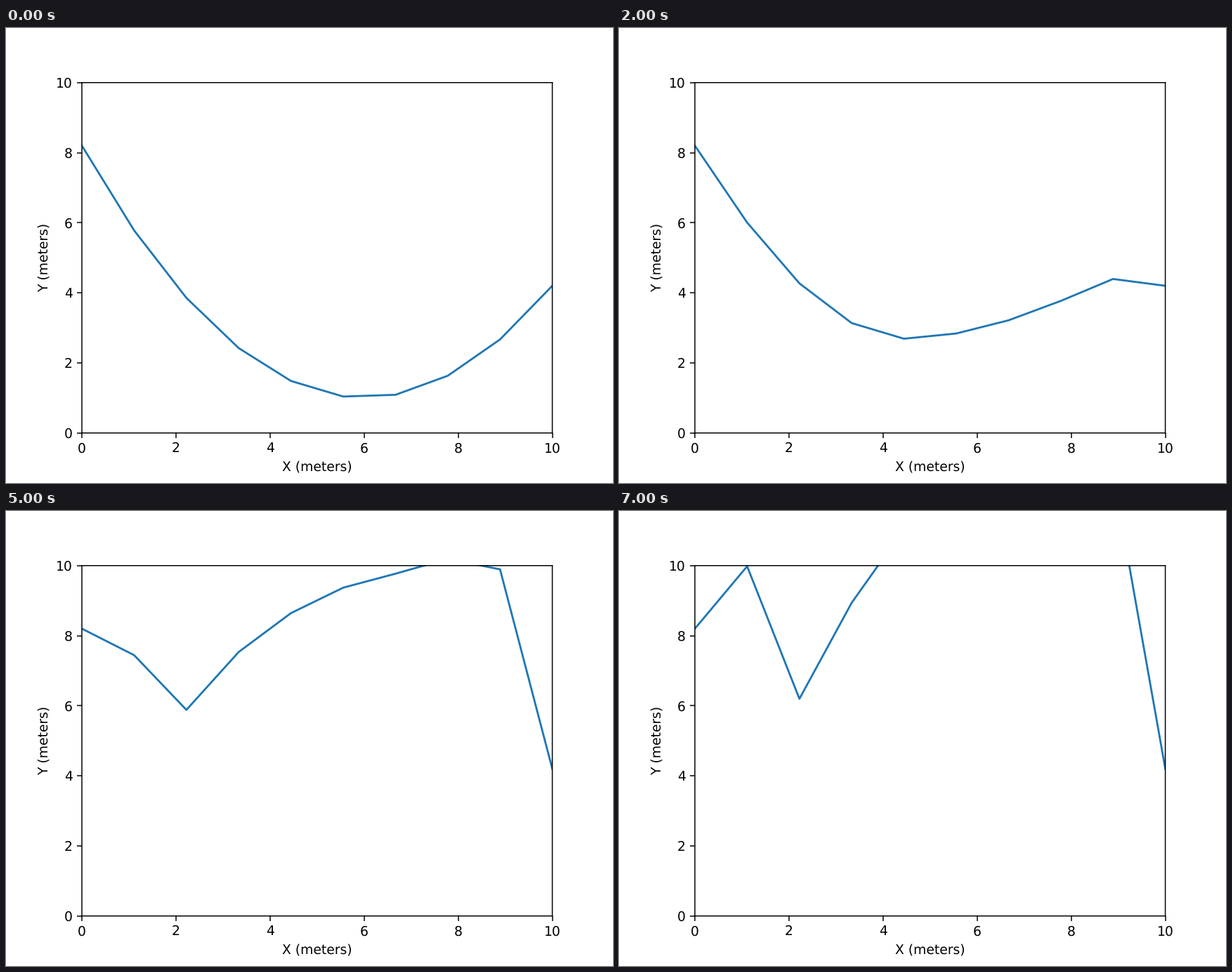
These frames come from a looping animation (864 by 648 pixels, 8000 ms). A matplotlib script:

```python
import numpy as np
import matplotlib.pyplot as plt
from matplotlib.animation import FuncAnimation

SECONDS = 8
STEPS = 100        # integration steps per second
SPEED = 2.2        # fastest climb, metres per second
BEST_RISE = 0.45   # rise between neighbours that climbs fastest

plt.rcParams["text.hinting"] = "none"

x = np.linspace(0, 10, 10)
start = 0.2 * (x - 6) ** 2 + 1

# The fixed ends hold back the points next to them.
inner = x[1:-1]
grip = 1 - np.exp(-np.minimum(inner, 10 - inner) / 0.6)


def climb(y):
    """Upward speed of the free points, set by the slope on their left."""
    rise = np.diff(y)
    left, right = rise[:-1], rise[1:]
    lean = left + 0.08 * (left - right)
    return SPEED * grip / np.cosh(lean - BEST_RISE)


def simulate():
    y = start.copy()
    shapes = [y.copy()]
    for second in range(SECONDS - 1):
        for step in range(STEPS):
            t = second + (step + 0.5) / STEPS
            pace = min(t / 2, 1)  # speeds up over the first two seconds
            y[1:-1] += climb(y) * pace / STEPS
        shapes.append(y.copy())
    return shapes


shapes = simulate()

fig, ax = plt.subplots(figsize=(6.4, 4.8), dpi=135)
ax.set(xlim=(0, 10), ylim=(0, 10), xlabel="X (meters)", ylabel="Y (meters)")
(line,) = ax.plot(x, start, color="#1f77b4", lw=1.5)

# Leave the frame and ticks at their true subpixel places.
for spine in ax.spines.values():
    spine.set_snap(False)
for tick in ax.get_xticklines() + ax.get_yticklines():
    tick.set_snap(False)


def draw(second):
    line.set_ydata(shapes[second])
    return (line,)


anim = FuncAnimation(fig, draw, frames=SECONDS, interval=1000, repeat=True)
plt.show()
```
